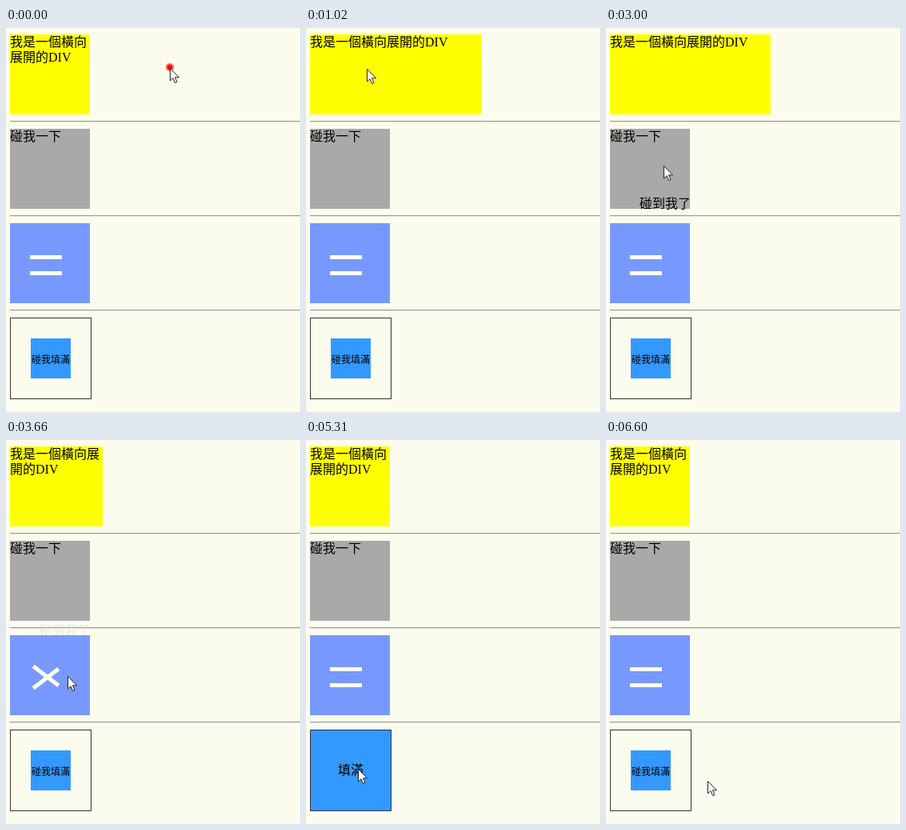
An HTML page for the animation above (7.02 s loop, 368 by 480 pixels).

```html
<!DOCTYPE html>
<html lang="zh-Hant">
<head>
<meta charset="utf-8">
<style>
html, body { margin: 0; width: 100%; height: 100%; overflow: hidden; background: #fcfcee; }
body { position: relative; color: #000; font: 16px/19px "Liberation Serif", "Noto Sans CJK TC", "Noto Sans CJK", serif; }
div, hr, svg { position: absolute; box-sizing: border-box; }
hr { left: 5px; right: -8px; height: 2px; margin: 0; border: 0; background: linear-gradient(#9a9a9c 50%, #e8e8e0 50%); }
.box { left: 5px; width: 100px; height: 100px; }
#wide { top: 8px; background: #ff0; }
#gray { top: 126px; background: #a9a9a9; }
#note { left: 37px; top: 84px; white-space: nowrap; }
#menu { top: 244px; background: #79f; }
.bar { left: 25px; width: 40px; height: 5px; background: #fffff0; }
#frame { top: 362px; width: 102px; height: 102px; border: 1px solid #333; }
#fill { left: 50px; top: 50px; transform: translate(-50%, -50%); background: #39f; display: flex; align-items: center; justify-content: center; white-space: nowrap; line-height: 1; }
#dot { left: 199px; top: 43px; width: 12px; height: 12px; border-radius: 50%; background: radial-gradient(circle, #f00 25%, #f008 50%, #f000 70%); }
#arrow { left: 0; top: 0; overflow: visible; }
</style>
</head>
<body>
<div class="box" id="wide">我是一個橫向展開的DIV</div>
<hr style="top:116px">
<div class="box" id="gray">碰我一下<div id="note">碰到我了</div></div>
<hr style="top:234px">
<div class="box" id="menu">
  <div class="bar" id="upper" style="top:40px"></div>
  <div class="bar" id="lower" style="top:60px"></div>
</div>
<hr style="top:352px">
<div class="box" id="frame"><div id="fill"></div></div>
<div id="dot"></div>
<svg id="arrow" width="13" height="20"><path d="M.5 .5V16L4 12.7 6.6 18.6 9 17.5 6.5 11.8H11.5Z" fill="#fff" stroke="#222"/></svg>
<script>
const LOOP = 7020;
const el = id => document.getElementById(id);
const [wide, note, upper, lower, fill, dot, arrow] =
  ["wide", "note", "upper", "lower", "fill", "dot", "arrow"].map(el);

// Pointer stops: time, x, y
const path = [
  [0, 205, 50], [100, 205, 50], [560, 76, 51], [2270, 76, 51], [2720, 72, 172],
  [3030, 72, 172], [3750, 77, 300], [4430, 77, 300], [4900, 65, 411],
  [5700, 65, 411], [6390, 127, 426], [LOOP, 127, 426]
];

const clamp = v => Math.min(1, Math.max(0, v));
const mix = (a, b, p) => a + (b - a) * p;

// CSS "ease": cubic-bezier(.25, .1, .25, 1)
function ease(x) {
  if (x <= 0 || x >= 1) return clamp(x);
  const curve = (s, a, b) => 3 * (1 - s) ** 2 * s * a + 3 * (1 - s) * s * s * b + s ** 3;
  let lo = 0, hi = 1;
  for (let i = 0; i < 20; i++) {
    const mid = (lo + hi) / 2;
    if (curve(mid, .25, .25) < x) lo = mid; else hi = mid;
  }
  return curve(lo, .1, 1);
}

const hover = (t, enter, leave, span) => ease((t - enter) / span) - ease((t - leave) / span);

function pointer(t) {
  const i = path.findIndex(p => p[0] > t);
  const a = path[i - 1], b = path[i];
  const u = (t - a[0]) / (b[0] - a[0]), p = u * u * (3 - 2 * u);
  return [mix(a[1], b[1], p), mix(a[2], b[2], p)];
}

function draw() {
  const t = performance.now() % LOOP;

  wide.style.width = mix(100, 300, hover(t, 420, 2478, 1800)) + "px";

  const shown = hover(t, 2530, 3351, 450);
  note.style.opacity = shown;
  note.style.transform = `translateY(${20 * (1 - shown)}px)`;

  const cross = hover(t, 3420, 4630, 450);
  upper.style.transform = `translateY(${10 * cross}px) rotate(${45 * cross}deg)`;
  lower.style.transform = `translateY(${-10 * cross}px) rotate(${-45 * cross}deg)`;

  const full = hover(t, 4760, 6125, 450);
  fill.style.width = fill.style.height = mix(50, 100, full) + "px";
  fill.style.fontSize = mix(12, 16, full) + "px";
  fill.style.paddingTop = mix(4, 0, full) + "px";
  fill.textContent = t >= 4760 && t < 6125 ? "填滿" : "碰我填滿";

  const [x, y] = pointer(t);
  arrow.style.transform = `translate(${Math.round(x)}px, ${Math.round(y)}px)`;
  dot.style.opacity = t < 120 ? 1 : 0;
  requestAnimationFrame(draw);
}
draw();
</script>
</body>
</html>
```
